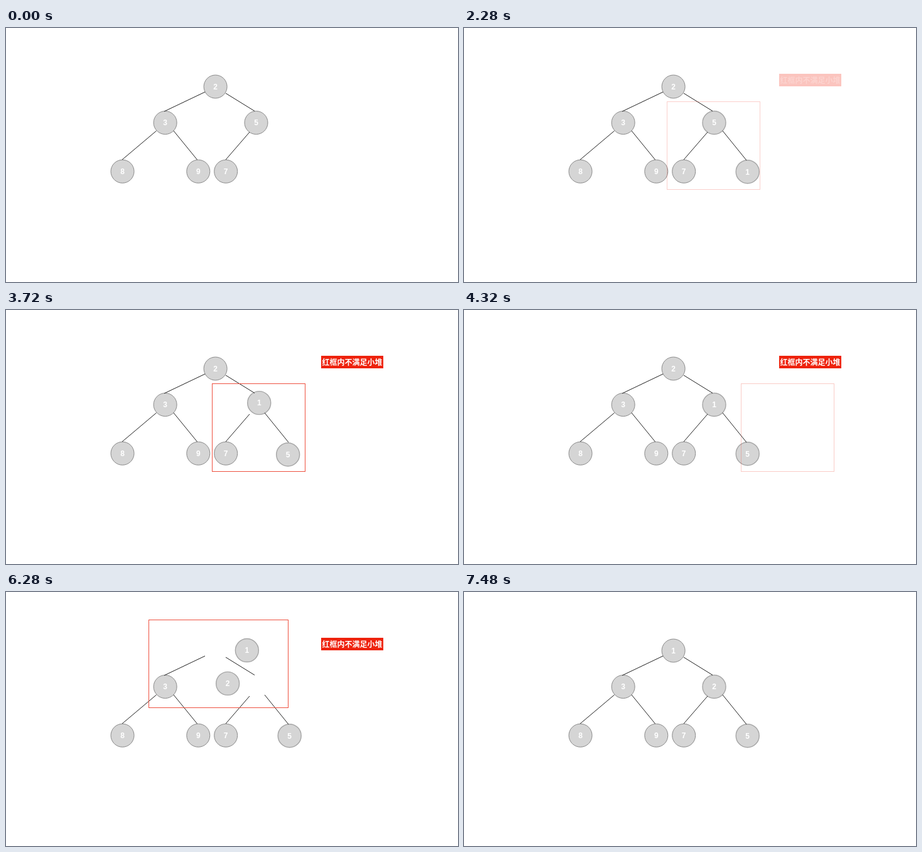
These frames come from a looping animation (720 by 405 pixels, 8.2 s). An HTML page with a canvas:

```html
<!DOCTYPE html>
<html lang="zh">
<head>
<meta charset="utf-8">
<title>Min-heap insertion</title>
<style>
html, body { margin: 0; width: 100%; height: 100%; overflow: hidden; background: #fff; }
canvas { display: block; width: 720px; height: 405px; }
</style>
</head>
<body>
<canvas id="stage" width="720" height="405"></canvas>
<script>
const ctx = document.getElementById('stage').getContext('2d');
const LOOP = 8200, STEP = 40;
const RED = '#ee220c';

// Slots of the tree
const ROOT = [333.6, 93.5], LEFT = [253.6, 151], RIGHT = [398.5, 151];
const LEAVES = [[185.5, 228.7], [306.3, 228.7], [350.2, 228.7], [451.7, 229.2]];

const EDGES = [
  [317, 102, 252, 133], [350, 104, 396, 132.5],
  [239.5, 164, 185, 210], [267, 164, 304.5, 210],
  [388, 166, 350, 210]
];
const NEW_EDGE = [412, 164, 450, 211];

const progress = (t, from, to) => Math.min(1, Math.max(0, (t - from) / (to - from)));
const sine = x => (1 - Math.cos(Math.PI * x)) / 2;
const swapEase = x => sine(Math.pow(x, 0.86));

// Half ellipse between two points, bulging by `bulge`
function arc(from, to, bulge, p) {
  const hx = (from[0] - to[0]) / 2, hy = (from[1] - to[1]) / 2;
  const c = Math.cos(Math.PI * p);
  const s = Math.sin(Math.PI * p) * bulge / Math.hypot(hx, hy);
  return [
    (from[0] + to[0]) / 2 + hx * c + hy * s,
    (from[1] + to[1]) / 2 + hy * c - hx * s
  ];
}

function line(x1, y1, x2, y2) {
  ctx.strokeStyle = '#222';
  ctx.lineWidth = 1;
  ctx.beginPath();
  ctx.moveTo(x1, y1);
  ctx.lineTo(x2, y2);
  ctx.stroke();
}

function node([x, y], digit, soft) {
  ctx.beginPath();
  ctx.arc(x, y, 18.5, 0, Math.PI * 2);
  ctx.fillStyle = '#d5d5d5';
  ctx.fill();
  ctx.strokeStyle = soft ? '#a6a6a6' : '#8a8a8a';
  ctx.lineWidth = soft ? 1.4 : 1;
  ctx.stroke();
  ctx.fillStyle = '#fff';
  ctx.font = 'bold 12px "Liberation Sans", Arial, sans-serif';
  ctx.fillText(digit, x, y + 4.3);
}

// Diagonal soft wipe: white cover retreating to the lower right
function wipeCover(p) {
  const edge = 646 + 76 * p, soft = 12;
  const at = sum => [452 + (sum - 681) / 2, 229 + (sum - 681) / 2];
  const g = ctx.createLinearGradient(...at(edge - soft), ...at(edge));
  g.addColorStop(0, 'rgba(255,255,255,0)');
  g.addColorStop(1, '#fff');
  ctx.fillStyle = g;
  ctx.fillRect(430, 207, 44, 45);
}

function frame(x, y, w, alpha) {
  if (alpha <= 0) return;
  ctx.globalAlpha = alpha;
  ctx.strokeStyle = '#ee5140';
  ctx.lineWidth = 1;
  ctx.strokeRect(Math.round(x) + 0.5, y + 0.5, w, 140);
  ctx.globalAlpha = 1;
}

function label(alpha) {
  if (alpha <= 0) return;
  ctx.globalAlpha = alpha;
  ctx.fillStyle = RED;
  ctx.fillRect(502, 73, 99, 20);
  ctx.fillStyle = '#fff';
  ctx.font = 'bold 12px "Noto Sans CJK SC", "Noto Sans CJK", sans-serif';
  ctx.fillText('红框内不满足小堆', 551.5, 88);
  ctx.globalAlpha = 1;
}

const slideIn = u => -8 * Math.pow(1 - u, 2.6);
const fadeIn = u => 1 - (1 - u) * (1 - u);

function nodes(t) {
  const first = swapEase(progress(t, 3000, 3840));
  const second = swapEase(progress(t, 5880, 6720));
  const leaf = LEAVES[3];

  if (t >= 960) {
    const one = second > 0 ? arc(RIGHT, ROOT, 34, second) : arc(leaf, RIGHT, 47, first);
    const wipe = progress(t, 960, 1760);
    node(one, '1', t >= 2200 && t < 7480);
    if (wipe < 1) wipeCover(sine(wipe));
  }
  node(arc(RIGHT, leaf, 24, first), '5', t >= 2200);
  node(arc(ROOT, RIGHT, 26.5, second), '2', t >= 5920);
  node(LEFT, '3');
  node(LEAVES[0], '8');
  node(LEAVES[1], '9');
  node(LEAVES[2], '7');
}

function edges(t) {
  EDGES.forEach(e => line(...e));
  const p = sine(progress(t, 80, 920));
  if (p > 0) {
    const [x1, y1, x2, y2] = NEW_EDGE;
    line(x1, y1, x1 + (x2 - x1) * p, y1 + (y2 - y1) * p);
  }
}

function marks(t) {
  const in1 = progress(t, 2160, 3000), out1 = progress(t, 3840, 4520);
  const in2 = progress(t, 5040, 5880), out2 = progress(t, 6720, 7480);
  const drift = 201 * Math.pow(progress(t, 3840, 4480), 2);
  frame(328 + slideIn(in1) + drift, 117, 148, fadeIn(in1) * (1 - out1));
  frame(227 + slideIn(in2), 44, 222, fadeIn(in2) * (1 - out2));
  label(fadeIn(in1) * (1 - out2));
}

function draw(t) {
  ctx.fillStyle = '#fff';
  ctx.fillRect(0, 0, 720, 405);
  ctx.textAlign = 'center';
  nodes(t);
  edges(t);
  marks(t);
}

let start;
function tick(now) {
  if (start === undefined) start = now;
  const t = (now - start) % LOOP;
  draw(Math.floor(t / STEP) * STEP);
  requestAnimationFrame(tick);
}
draw(0);
requestAnimationFrame(tick);
</script>
</body>
</html>
```
